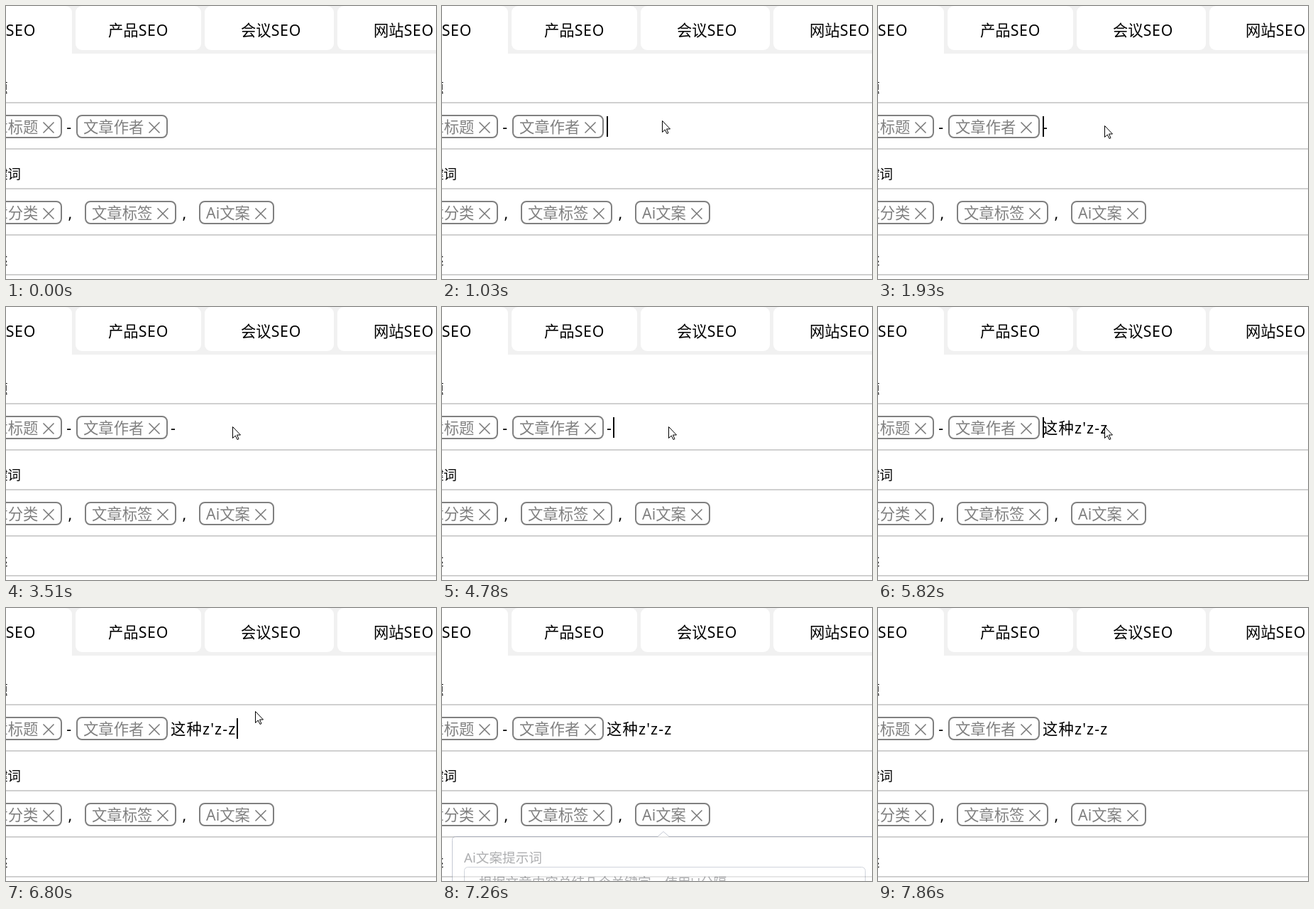
Recreate the animation shown at these times as an HTML page. Size 606 by 384 pixels, loop 7880 ms.

```html
<!DOCTYPE html>
<html lang="zh-CN">
<head>
<meta charset="utf-8">
<title>SEO</title>
<style>
  html, body { margin: 0; width: 100%; height: 100%; overflow: hidden; background: #fff; }
  svg { display: block; width: 606px; height: 384px; }
  text {
    font: 21.33px "Noto Sans", "Noto Sans CJK SC", "Noto Sans CJK", sans-serif;
    white-space: pre;
  }
  .label, #popup text { font-size: 18.67px; }
  .label { text-anchor: end; }
  .latin { letter-spacing: .7px; }
  .chip text { fill: #808080; }
  .chip rect { fill: #fff; stroke: #808080; stroke-width: 2; }
  .chip path { fill: none; stroke: #777; stroke-width: 1.5; }
  #typed { letter-spacing: 1.15px; }
  #ime text { fill: #fff; }
  #ime .num { fill: #c4c4c4; }
  #popup text { fill: #606266; }
</style>
</head>
<body>
<svg viewBox="0 0 606 384">
  <defs>
    <filter id="shadow" x="-10%" y="-50%" width="120%" height="220%">
      <feDropShadow dx="0" dy="8" stdDeviation="6" flood-color="#000" flood-opacity=".28"/>
    </filter>
  </defs>
  <rect width="606" height="67" fill="#f1f1f1"/>
  <g id="page"></g>
  <text id="typed" x="232" y="178"></text>
  <rect id="caret" y="155" width="2" height="29"/>
  <g id="ime">
    <rect x="235" y="184" width="420" height="53" rx="7" fill="#2b2b2b" stroke="#9a9a9a" stroke-width="2" filter="url(#shadow)"/>
    <rect id="pill" x="240" y="191" height="38" rx="5" fill="#383838"/>
    <rect x="240" y="198" width="5" height="24" rx="2.5" fill="#dcb68e"/>
    <g id="words"></g>
  </g>
  <g id="popup">
    <path d="M19.5 321.5H304L312 314.5L320 321.5H620V400H14.5V326.5Q14.5 321.5 19.5 321.5Z" fill="#fff" stroke="#8c95aa"/>
    <text x="31" y="358">Ai文案提示词</text>
    <rect x="31.5" y="364.5" width="565" height="60" rx="5" fill="#fff" stroke="#a3abbb"/>
    <text x="52" y="393">根据文章内容总结几个关键字，使用','分隔</text>
  </g>
  <path id="mouse" d="M.5 .5V16.5L4.3 13L7 18.5L9 17.6L6.5 12H11.5Z" fill="#fff" stroke="#000"/>
</svg>
<script>
const LOOP = 7880, TICK = 74, BLINK = 520, FADE = 4 * TICK;
const $ = id => document.getElementById(id);

const text = (x, y, s, cls = "") => `<text class="${cls}" x="${x}" y="${y}">${s}</text>`;

// Tabs share one pitch; the first is active and reaches down to the page.
function tab(name, i) {
  const x = i ? Math.max(98, 187 * i - 94) : -94;
  const right = 187 * i + (i ? 88 : 93);
  return `<rect x="${x}" width="${right - x}" height="${i ? 62 : 90}" rx="9" fill="#fff"/>` +
    text(187 * i - 43, 42, `${name}<tspan class="latin">SEO</tspan>`);
}

// A chip is placed by its outer right edge.
const chip = (right, s, width = 129) => `<g class="chip">
  <rect x="${right - width + 1}" y="154" width="${width - 2}" height="31" rx="7"/>
  ${text(right - width + 10, 178, s)}
  <path d="M${right - 26.5} 163.5l15 15m0 -15l-15 15"/></g>`;

const section = ([label, edge, body], i) => `<g transform="translate(0 ${121 * i})">
  <path d="M0 136H606M0 201H606" stroke="#d0d0d0" stroke-width="2"/>
  ${text(edge, 122.3, label, "label")}${body}</g>`;

$("page").innerHTML =
  ["文章", "产品", "会议", "网站"].map(tab).join("") +
  `<rect y="67" width="606" height="317" fill="#fff"/>` +
  [
    ["标题", 2.4, chip(79, "文章标题") + text(85.3, 178, "-") + chip(228, "文章作者")],
    ["关键词", 21, chip(79, "文章分类") + text(87.5, 178, ",") + chip(240, "文章标签") +
      text(248.5, 178, ",") + chip(378, "Ai文案", 106)],
    ["描述", 2.4, ""]
  ].map(section).join("");

// Each edit restarts the blink: start, text, caret position in the text (-1 for none)
const RESULT = "这种z'z-z";
const edits = [
  [0, "", -1], [660, "", 0], [1930, "-", 0], [3650, "-", 1], [3740, "-", 1],
  [4850, "-z", 0], [5010, "z'z-z", 0], [5820, RESULT, 0],
  [6580, RESULT, RESULT.length], [7860, RESULT, -1]
];

// Pointer path: time, x, y
const trail = [
  [140, 120, 318], [510, 305, 157], [954, 305, 157], [1176, 319, 168],
  [6356, 319, 168], [6578, 345, 176], [6652, 345, 176], [6810, 351, 143], [7244, 325, 384]
];

const clamp = v => Math.min(1, Math.max(0, v));
const show = (el, on) => el.setAttribute("visibility", on ? "visible" : "hidden");

function drawText(t) {
  const [since, s, at] = edits.filter(e => e[0] <= t).pop();
  const typed = $("typed");
  typed.textContent = s;
  const offset = at > 0 ? Math.ceil(typed.getSubStringLength(0, at)) : 0;
  $("caret").setAttribute("x", 232 + offset);
  show($("caret"), at >= 0 && Math.floor((t - since) / BLINK) % 2 === 0);
}

let shownWords = "";
function drawIme(t) {
  show($("ime"), t >= 4850 && t < 5820);
  const words = t < 5010 ? "在 中 这 再 最" : "这种 正则 作者 制作";
  if (words === shownWords) return;
  shownWords = words;
  const list = words.split(" ");
  const wide = 21 * list[0].length;
  $("pill").setAttribute("width", wide + 51);
  $("words").innerHTML = list.map((s, i) => {
    const x = 257 + i * (wide + 57);
    return text(x, 218.5, i + 1, "num") + text(x + 18.5, 218.5, s);
  }).join("");
}

function drawMouse(t) {
  const i = trail.findIndex(p => p[0] > t);
  show($("mouse"), i > 0);
  if (i < 1) return;
  const [a, b] = [trail[i - 1], trail[i]];
  const k = (t - a[0]) / (b[0] - a[0]);
  const [x, y] = [1, 2].map(n => Math.round(a[n] + (b[n] - a[n]) * k));
  $("mouse").setAttribute("transform", `translate(${x} ${y})`);
}

function draw(t) {
  const step = 66 + Math.floor((t - 66) / TICK) * TICK;
  drawText(t);
  drawIme(t);
  drawMouse(step);
  $("popup").setAttribute("opacity", clamp((step - 7096) / FADE) - clamp((step - 7540) / FADE));
}

const start = performance.now();
function tick() {
  draw((performance.now() - start) % LOOP);
  requestAnimationFrame(tick);
}
tick();
</script>
</body>
</html>
```
